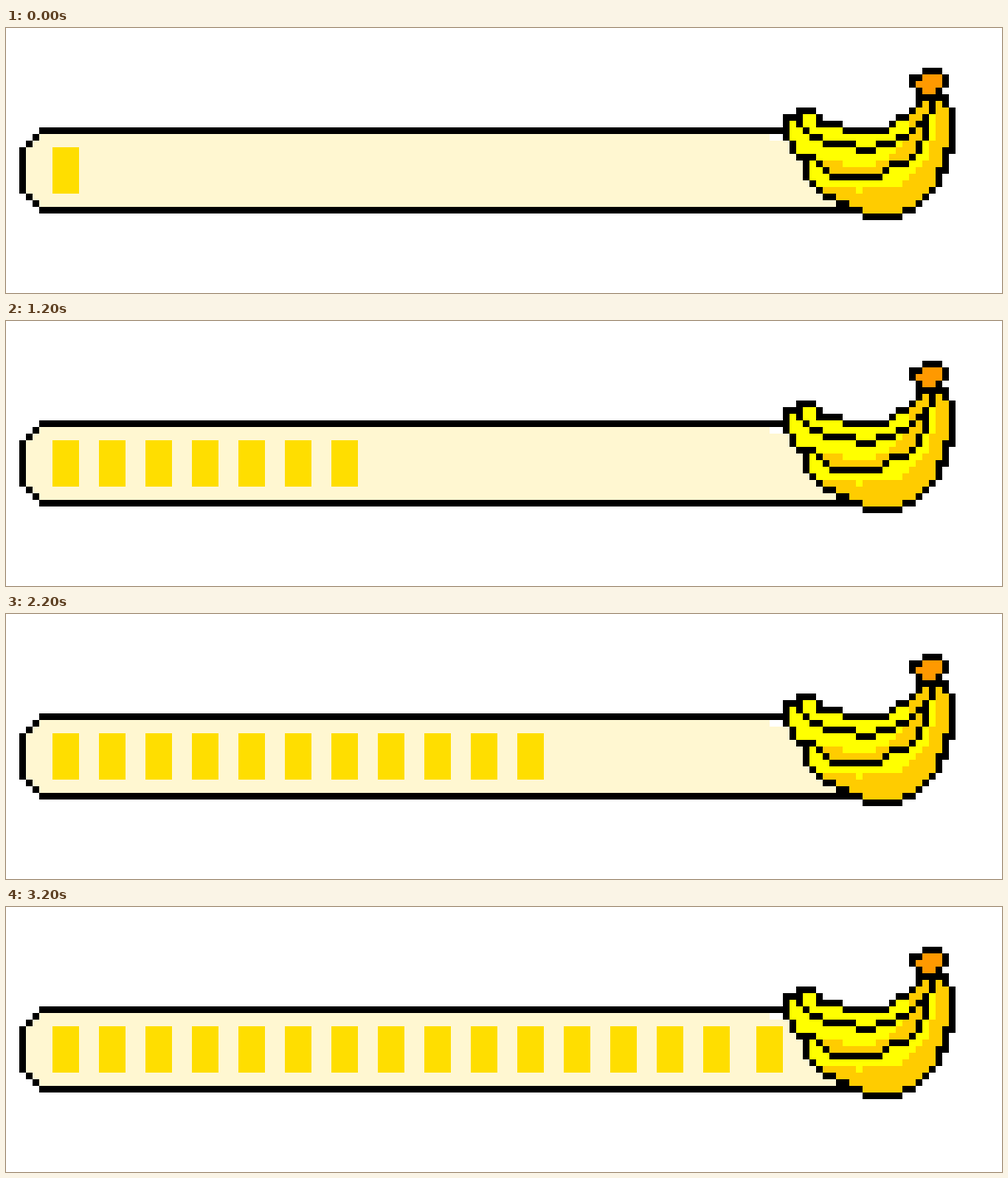
Write an HTML page with a canvas that moves like this. It is 1200 px wide and 320 px high and loops after 3400 ms.

```html
<!DOCTYPE html>
<html lang="en">
<head>
<meta charset="utf-8">
<title>Banana loading bar</title>
<style>
  html, body { margin: 0; width: 100%; height: 100%; overflow: hidden; background: #fff; }
  canvas { display: block; }
</style>
</head>
<body>
<canvas id="stage" width="1200" height="320"></canvas>
<script>
const ctx = document.getElementById('stage').getContext('2d');
const CELL = 8, COLS = 150, ROWS = 40;
const BLACK = '#000', CREAM = '#fff7d1', BLOCK = '#ffde00';
const YELLOW = '#ffff00', GOLD = '#ffcc00', ORANGE = '#ff9900';

function rect(color, x, y, w = 1, h = 1) {
  ctx.fillStyle = color;
  ctx.fillRect(x * CELL, y * CELL, w * CELL, h * CELL);
}

// Fill the cells inside a closed shape that also satisfy a rule.
function fill(color, points, rule = () => true) {
  const shape = new Path2D();
  points.forEach(([x, y]) => shape.lineTo(x, y));
  shape.closePath();
  for (let y = 0; y < ROWS; y++)
    for (let x = 0; x < COLS; x++)
      if (rule(x, y) && ctx.isPointInPath(shape, x, y)) rect(color, x, y);
}

// Black pixel line through the key points.
function trace(points) {
  points.slice(1).forEach(([x1, y1], i) => {
    const [x0, y0] = points[i];
    const steps = Math.max(Math.abs(x1 - x0), Math.abs(y1 - y0));
    for (let s = 0; s <= steps; s++)
      rect(BLACK, Math.round(x0 + (x1 - x0) * s / steps), Math.round(y0 + (y1 - y0) * s / steps));
  });
}

const bar = [[128, 15], [5, 15], [2, 18], [2, 24], [5, 27], [128, 27]];

const bananas = [
  [117, 13], [117, 16], [119, 19], [120, 19], [120, 22], [123, 25], [128, 27], [129, 28],
  [134, 28], [135, 27], [136, 27], [140, 23], [140, 21], [141, 21], [141, 18], [142, 18],
  [142, 12], [141, 11], [141, 10], [137, 10], [137, 11], [135, 13], [134, 13], [132, 15],
  [126, 15], [125, 14], [122, 14], [121, 12], [119, 12], [118, 13], [117, 13]
];
const upperCrease = [
  [119, 13], [119, 14], [121, 16], [124, 17], [126, 17], [130, 18], [131, 17], [135, 16], [138, 13]
];
const lowerCrease = [
  [119, 19], [121, 19], [124, 22], [131, 22], [133, 20], [135, 20], [137, 18], [137, 17],
  [138, 16], [138, 13], [139, 11], [139, 10]
];
const stem = [
  [138, 6], [140, 6], [141, 7], [141, 8], [140, 9], [140, 10], [137, 10], [137, 9],
  [136, 8], [136, 7], [138, 6]
];

const frontShade = (x, y) => y > 23 || x > 139 || (x > 138 && y > 16) || x + y > 157;
const backShade = (x, y) => y > 20 || x > 135 || x + y > 151 || (y > 19 && Math.abs(x - 128) > 2);

function drawScene() {
  fill(CREAM, bar);
  trace(bar);
  rect('#fff', 115, 16, 2);

  fill(YELLOW, bananas);
  fill(GOLD, bananas, frontShade);
  fill(GOLD, lowerCrease, backShade);
  rect(YELLOW, 128, 24);
  fill(ORANGE, stem);
  [bananas, upperCrease, lowerCrease, stem].forEach(trace);
}

function drawProgress(now) {
  const step = Math.floor(now % 3400 / 200);
  const count = step < 10 ? step + 1 : step; // pauses for one step at ten blocks
  rect(CREAM, 7, 18, 110, 7);
  for (let i = 0; i < count; i++)
    rect(BLOCK, i < 15 ? 7 + 7 * i : 113, 18, 4, 7);
}

function frame() {
  drawProgress(performance.now());
  requestAnimationFrame(frame);
}

drawScene();
frame();
</script>
</body>
</html>
```
